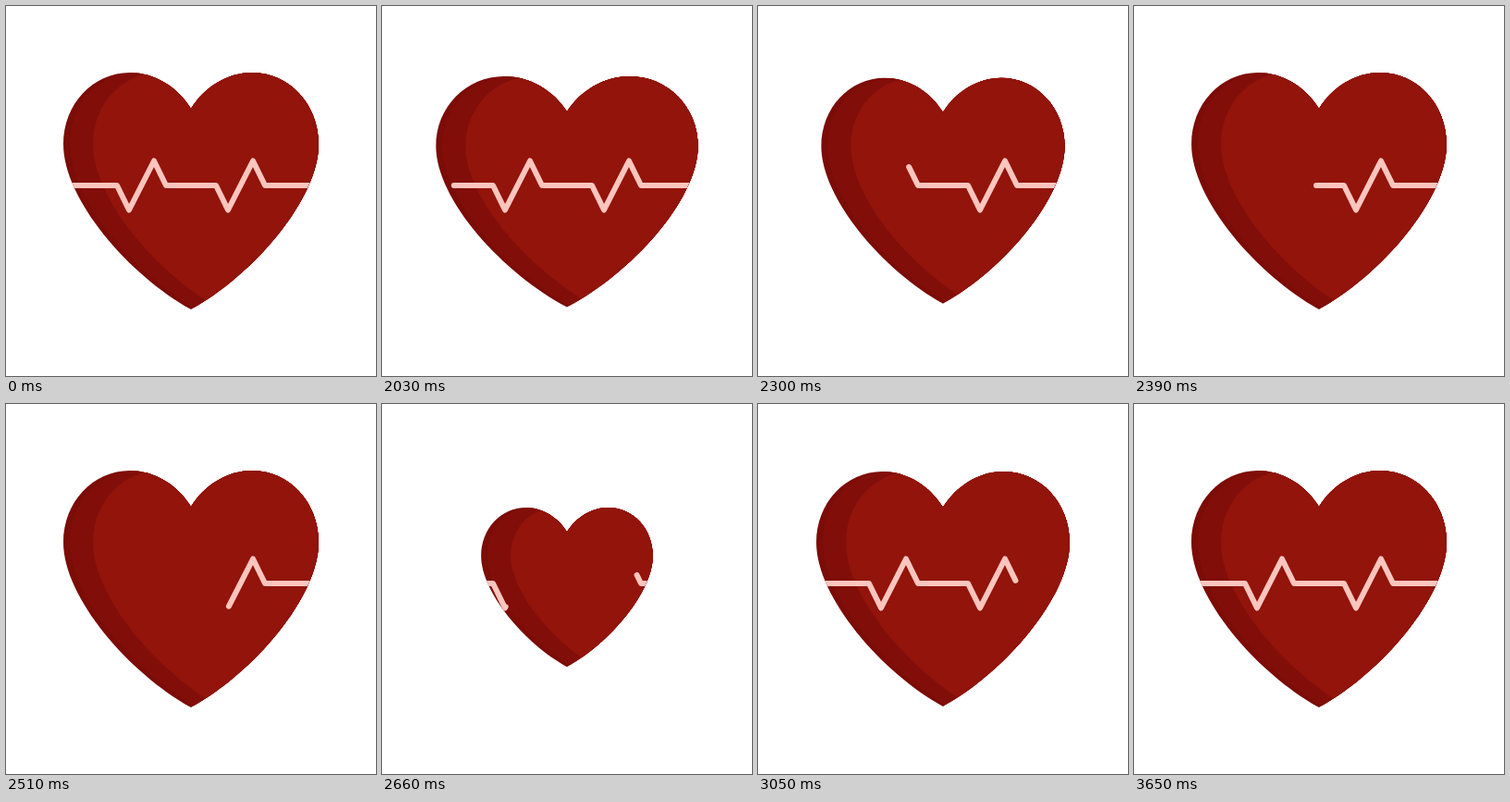
These frames come from a looping animation (400x400 px, 3710 ms). An HTML page with a canvas:

```html
<!DOCTYPE html>
<html lang="en">
<head>
<meta charset="utf-8">
<title>Heartbeat</title>
<style>
  html, body { margin: 0; width: 100%; height: 100%; overflow: hidden; background: #fff; }
  canvas { display: block; width: 100vmin; height: 100vmin; margin: auto; }
</style>
</head>
<body>
<canvas id="stage" width="400" height="400"></canvas>
<script>
const ctx = document.getElementById('stage').getContext('2d');
const LOOP = 3710, REST_END = 2030, STEP = 30;
const CENTER = { x: 200, y: 194 };
const COLORS = { edge: '#7b0c08', shade: '#820e09', body: '#92140b', pulse: '#fcc5be' };

// Outline relative to CENTER.
const heart = new Path2D(
  'M0-83C-14-106-39-122-66-122C-106-122-138-88-138-44.5C-138 15-67 97 0 134' +
  'C67 97 138 15 138-44.5C138-88 106-122 66-122C39-122 14-106 0-83Z');

const pulse = [[66, 194], [120, 194], [133, 220.5], [160, 167.5], [173, 194],
  [227, 194], [240, 220.5], [267, 167.5], [280, 194], [334, 194]];
const pulseLength = pulse.slice(1).reduce(
  (sum, [x, y], i) => sum + Math.hypot(x - pulse[i][0], y - pulse[i][1]), 0);

const inOut = p => p < 0.5 ? 2 * p * p : 1 - 2 * (1 - p) ** 2;
const out = p => 1 - (1 - p) ** 3;

// Each key: time, horizontal scale, vertical scale, drop, easing towards it.
const keys = [
  [2000, 1, 1, 0],
  [2080, 1.095, 0.91, 3, inOut],
  [2190, 0.674, 0.672, 0, inOut],
  [2420, 1, 1, 0, out],
  [2520, 1, 1, 0, inOut],
  [2670, 0.67, 0.67, 0, inOut],
  [3200, 1, 1, 0, out]
];

function poseAt(t) {
  const next = keys.findIndex(key => key[0] > t);
  if (next < 1) return [1, 1, 0];
  const a = keys[next - 1], b = keys[next];
  const p = b[4]((t - a[0]) / (b[0] - a[0]));
  return [1, 2, 3].map(i => a[i] + (b[i] - a[i]) * p);
}

function drawPulse(from, to) {
  from = Math.max(0, from);
  to = Math.min(pulseLength, to);
  if (from >= to) return;
  ctx.beginPath();
  let travelled = 0, started = false;
  for (let i = 1; i < pulse.length; i++) {
    const [ax, ay] = pulse[i - 1], [bx, by] = pulse[i];
    const length = Math.hypot(bx - ax, by - ay);
    const point = d => [ax + (bx - ax) * d / length, ay + (by - ay) * d / length];
    const start = Math.max(0, from - travelled), end = Math.min(length, to - travelled);
    if (start < end) {
      if (!started) ctx.moveTo(...point(start));
      ctx.lineTo(...point(end));
      started = true;
    }
    travelled += length;
  }
  ctx.stroke();
}

function draw(t) {
  const [sx, sy, drop] = poseAt(t);
  const scaledHeart = shift => {
    const path = new Path2D();
    path.addPath(heart, new DOMMatrix([sx, 0, 0, sy, CENTER.x + shift, CENTER.y + drop]));
    return path;
  };
  // The shade keeps its width while the heart scales.
  const fillShifted = (shift, color) => {
    const crest = CENTER.x - 66 * sx + shift;
    ctx.fillStyle = color;
    ctx.fill(scaledHeart(shift));
    ctx.fillRect(crest, 0, 400 - crest, CENTER.y - 46 * sy);
    ctx.fillRect(CENTER.x + shift, 0, 400, 400);
  };

  ctx.fillStyle = '#fff';
  ctx.fillRect(0, 0, 400, 400);
  ctx.save();
  ctx.clip(scaledHeart(0));
  ctx.fillStyle = COLORS.edge;
  ctx.fillRect(0, 0, 400, 400);
  fillShifted(7, COLORS.shade);
  fillShifted(32, COLORS.body);

  ctx.strokeStyle = COLORS.pulse;
  ctx.lineWidth = 6;
  ctx.lineCap = ctx.lineJoin = 'round';
  drawPulse((t - 2007) * 0.513, pulseLength);
  drawPulse(0, (t - 2531) * 0.658);
  ctx.restore();
}

const origin = performance.now();
function frame() {
  const t = (performance.now() - origin) % LOOP;
  draw(t < REST_END ? 0 : REST_END + Math.floor((t - REST_END) / STEP) * STEP);
  requestAnimationFrame(frame);
}
frame();
</script>
</body>
</html>
```
